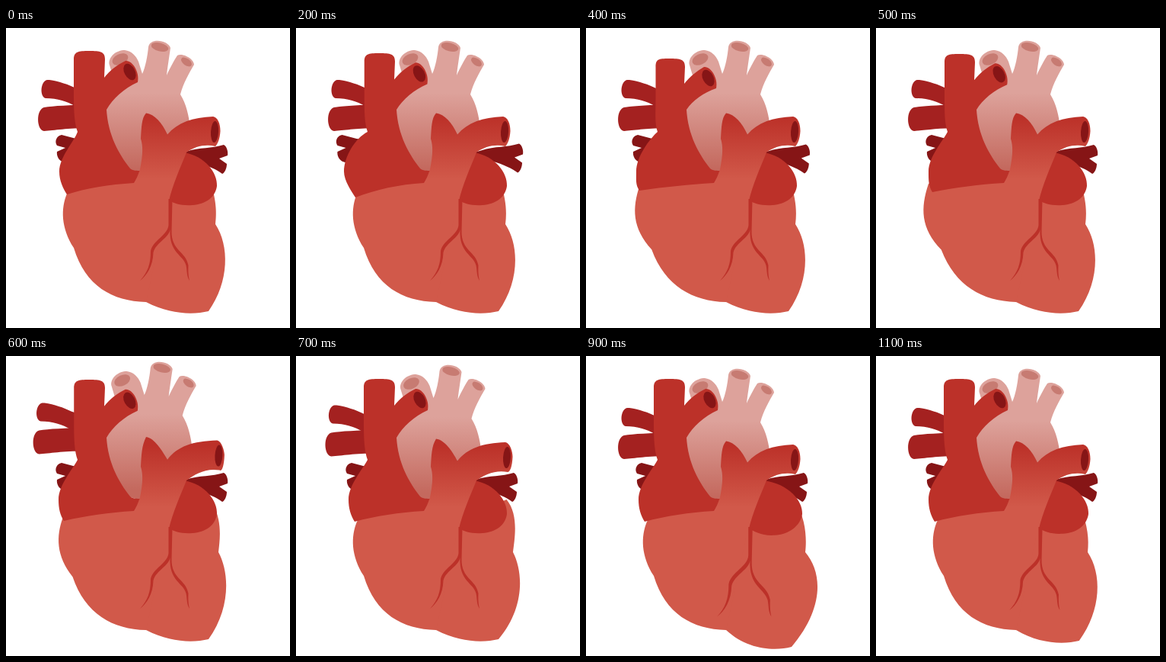
These frames come from a looping animation (373x393 px, 1200 ms). An HTML page:

```html
<!DOCTYPE html>
<html lang="en">
<head>
<meta charset="utf-8">
<title>Beating heart</title>
<style>
  html, body { margin: 0; width: 100%; height: 100%; overflow: hidden; background: #fff; }
  svg { display: block; width: 100vw; height: 100vh; }
  .wall { fill: #d1594a; }
  .red { fill: #bc3129; }
  .dark { fill: #861516; }
  .vein { fill: #a42120; }
  .hole { fill: #c77b72; }
</style>
</head>
<body>
<svg viewBox="0 0 373 393">
  <defs>
    <linearGradient id="pink" gradientUnits="userSpaceOnUse" x1="0" y1="85" x2="0" y2="184">
      <stop offset="0" stop-color="#dda29b"/><stop offset="1" stop-color="#c4695e"/>
    </linearGradient>
    <linearGradient id="blend" gradientUnits="userSpaceOnUse" x1="0" y1="118" x2="0" y2="198">
      <stop offset="0" stop-color="#bc3129"/><stop offset="1" stop-color="#d1594a"/>
    </linearGradient>
  </defs>

  <g id="veins" class="vein">
    <path d="M57 68C70 70 82 74 92 79L110 85V112L92 103C80 96 68 92 52 92C44 90 45 70 54 68Z"/>
    <path d="M110 100C85 101 62 102 50 104C39 107 40 134 50 135C64 134 80 131 110 131Z"/>
  </g>
  <path id="smallLeft" class="dark" d="M73 140L92 145L112 148V168L92 166L77 176C70 175 66 168 67 162L78 157L67 154C63 148 67 141 73 140Z"/>
  <path id="smallRight" class="dark" d="M222 166L236 162C255 156 270 158 286 153C290 155 292 162 291 167L280 171L290 178C290 184 287 190 284 191C277 186 266 180 250 176L222 172Z"/>

  <path id="rightVentricle" class="wall"/>
  <path id="leftVentricle" class="wall"/>

  <g id="aorta">
    <path fill="url(#pink)" d="M135.500 47C135 37 145 29 156 29C165 30 171 37 174 44L179 60C183 52 186 36 187 25C189 12 213 16 216 26C214 40 212 53 211 62C215 53 221 42 225 36C231 32 247 40 247 48C240 60 233 72 229 87C237 100 240 115 242 130L225 150L180 200L148 190L118 125L140 62Z"/>
    <ellipse class="hole" cx="150" cy="41" rx="11" ry="7" transform="rotate(-25 150 41)"/>
    <ellipse class="hole" cx="202" cy="25" rx="11.5" ry="5.5" transform="rotate(14 202 25)"/>
    <ellipse class="hole" cx="237" cy="44.5" rx="8" ry="4.5" transform="rotate(35 237 44.5)"/>
  </g>

  <path id="rightAtrium" class="red"/>
  <ellipse id="cavaHole" class="dark" rx="7" ry="11.5"/>
  <path id="leftAtrium" class="red"/>
  <path id="trunk" fill="url(#blend)"/>
  <ellipse id="trunkHole" class="dark" rx="5" ry="14"/>
  <path id="coronary" class="red" d="M213.500 224L218.500 224L217.500 266C217 292 236 292 239.500 311C239 322 240 326 241 331C237 325 238 318 236.500 311C233 297 214 295 215.500 264C214 275 197 281 193.500 294C193 312 185 324 176 331C186 320 190 310 190 292C193 278 213 271 213.500 258Z"/>
</svg>

<script>
const STEP = 100, COUNT = 12;

// Offsets in pixels for each step of the beat; missing steps are at rest.
const beat = {
  small:   [0, .7, 1, .75, .4],
  cava:    [0, 1, 3, 8, 10, 4, 1],
  bulge:   [0, 4, 7, 6, 4, 1, 1, 1, 1, 1, 1, 1],
  cornerX: [0, 0, -2, -7, -10, -6, -4, -3, -3, -3, -3, -3],
  cornerY: [0, 2, 4, -1, -5, -3, -2, -1, -1, -1, -1, -1],
  right:   [0, 0, 0, 5, 11, 13, 6],
  arch:    [0, 0, 0, 0, 0, 0, 1.8, 1, .2],
  side:    [0, 0, 0, 0, 0, 0, 1, 6, 19, 17, 9, 3],
  notch:   [0, 0, 0, 0, 0, 0, 4, 10, 14, 13, 8, 3],
  shoulder:[0, 0, 0, 0, 0, 0, 8, 17, 16, 13, 8, 2],
  base:    [0, 0, 0, 0, 0, 0, 0, 0, 13, 10, 6, 2],
  left:    [0, 0, 0, 0, 0, 0, 0, 0, 5, 7, 5, 2]
};

const el = id => document.getElementById(id);
const set = (id, attrs) => {
  for (const name in attrs) el(id).setAttribute(name, attrs[name]);
};
const move = (x, y) => `translate(${x} ${y})`;

function rightVentricle(v) {
  const c = 72 - 1.05 * v;
  return `M${80 - .85 * v} ${217 - v}C${c} 236 ${c} 262 ${89 - .25 * v} ${288 + .2 * v}
    C104 338 140 358 184 359L220 340V205L200 200L160 192L95 195Z`;
}

function leftVentricle(side, notch, u, base) {
  const c = 293.5 + side * 1.15 - notch * .1;
  return `M184 359C${215 - base * .3} ${375 + base} ${245 + base * .3} ${376 + base * 1.1} ${266 + base * .4} ${371 + base}
    C${c} 332 ${c} 285 ${275 + notch} 257
    C${277 + notch} 240 ${276 + u} ${225 - u} ${268 + .5 * u} ${200 - .7 * u}L215 215Z`;
}

function rightAtrium(d, k, dx, dy) {
  const x = 80 + dx, y = 218 + dy, l = 70 - k;
  const top = 30 + d, rim = 41 + d, tubeL = 89 + .25 * d;
  const bx = -.2 * d, by = .8 * d;
  return `M${tubeL} ${rim}C${tubeL} ${top + 1} 95 ${top} 109 ${top}C124 ${top} 130 ${top + 1} 130 ${rim}L129 ${65 + by}
    C137 ${55 + by} 145 ${49 + by} ${157 + bx} ${43 + by}C${166 + bx} ${42 + by} ${176 + bx} ${58 + by} ${173 + bx} ${71 + by}
    C155 ${79 + by * .7} 140 ${93 + by * .2} 132 107C134 140 148 165 163 184C166 187 172 187 178 187L168 203
    C135 205 105 ${210 + dy * .4} ${x} ${y}C${x - 5} ${y - 8} ${l} 200 ${l} 188
    C${l} 169 ${90 - 1.8 * k} ${148 - .5 * k} 94 136C90 125 ${tubeL} 110 ${tubeL} 90Z`;
}

function leftAtrium(l) {
  return `M234 163C${262 + l * .7} 168 ${278 + l} 190 ${277 + l} 207C${275 + l} 222 ${262 + l * .7} ${231 + l * .4} ${245 + l * .4} ${232 + l * .4}
    C230 ${233 + l * .4} 222 230 214 226L216 200Z`;
}

function trunk(s) {
  const x = 3 * s, y = -3 * s;
  return `M184 ${111.5 + y}C195 ${113 + y} 205 124 212 ${139.5 + y * .7}C225 ${124 + y} 245 ${117 + y} ${272 + x} ${116 + y}
    C${278 + x} ${117 + y} ${281.5 + x} 125 ${281.5 + x} ${135 + y}C${281 + x} 145 ${278 + x} 152 ${275 + x} ${155 + y}
    C262 ${152 + y} 248 155 237 163C228 185 219 205 214 226V240L168 230V204
    C170 200 174 192 176 185C180 165 180 155 177 145C178 130 178 118 184 ${111.5 + y}Z`;
}

function draw(step) {
  const p = {};
  for (const name in beat) p[name] = beat[name][step] || 0;
  const grow = 1 + .01 * p.base;

  set('veins', { transform: move(-3.6 * p.arch, -3.6 * p.arch) });
  set('smallLeft', { transform: move(-12.5 * p.small, 0) });
  set('smallRight', { transform: move(7 * p.small, -1.5 * p.small) });
  set('aorta', { transform: move(1.5 * p.arch, -5 * p.arch) });
  set('rightVentricle', { d: rightVentricle(p.right) });
  set('leftVentricle', { d: leftVentricle(p.side, p.notch, p.shoulder, p.base) });
  set('rightAtrium', { d: rightAtrium(p.cava, p.bulge, p.cornerX, p.cornerY) });
  set('cavaHole', { transform: move(162.5 - .2 * p.cava, 57.5 + .8 * p.cava) + ' rotate(-28)' });
  set('leftAtrium', { d: leftAtrium(p.left) });
  set('trunk', { d: trunk(p.arch) });
  set('trunkHole', { transform: move(274 + 3 * p.arch, 136 - 3 * p.arch) + ' rotate(3)' });
  set('coronary', { transform: `translate(216 225) scale(${grow}) translate(-216 -225)` });
}

const start = performance.now();
function tick() {
  const time = Math.max(0, performance.now() - start);
  draw(Math.floor(time / STEP) % COUNT);
  requestAnimationFrame(tick);
}
tick();
</script>
</body>
</html>
```
